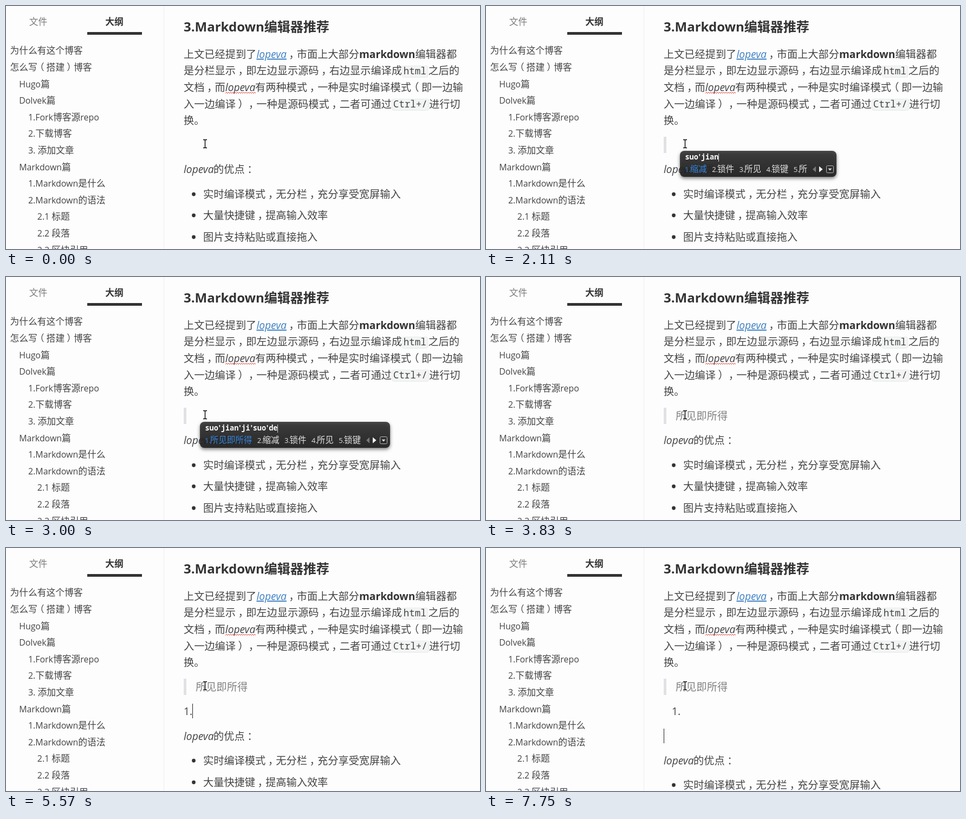
Animation of 875 by 448 pixels, one loop 8 s. Source, as an HTML page:

```html
<!DOCTYPE html>
<html lang="zh-CN">
<head>
<meta charset="utf-8">
<title>Markdown editor</title>
<style>
html, body { margin: 0; width: 100%; height: 100%; overflow: hidden; background: #fdfdfd; }
svg { display: block; }
text { font: 19.2px "Open Sans", "Noto Sans CJK SC", sans-serif; fill: #444; white-space: pre; text-spacing-trim: space-all; }
.h { font-size: 24px; font-weight: 700; fill: #333; }
.b { font-weight: 700; fill: #333; }
.i { font-style: italic; }
.link { font-style: italic; fill: #4183c4; text-decoration: underline; }
.code { font: 17.5px "Noto Sans Mono", monospace; }
.quote { fill: #808080; }
.side { font-size: 16.8px; }
.side tspan { font-size: 15.9px; }
.tab { font-size: 16.8px; fill: #7c7c7c; }
.on { font-size: 16.8px; font-weight: 700; fill: #333; }
.py { font: 700 13.5px "Noto Sans Mono", monospace; fill: #fff; }
.cand { font-size: 15.5px; fill: #e2e2e2; }
.cand tspan { font-size: 13px; }
.first { fill: #3584dc; }
#panel { filter: drop-shadow(0 3px 3px rgba(0, 0, 0, .55)); }
</style>
</head>
<body>
<svg width="875" height="448" viewBox="0 0 875 448">
  <defs>
    <linearGradient id="dark" x2="0" y2="1">
      <stop offset="0" stop-color="#343434"/>
      <stop offset="1" stop-color="#1f1f1f"/>
    </linearGradient>
    <path id="beam" d="M364 246.5h2.5l1 1 1-1h2.5M367.5 247v14M364 261.5h2.5l1-1 1 1h2.5"/>
  </defs>
  <rect width="875" height="448" fill="#fdfdfd"/>
  <g id="page"></g>
  <g id="edit"></g>
  <g id="ime"></g>
  <g fill="none">
    <use href="#beam" stroke="#fff" stroke-width="3"/>
    <use href="#beam" stroke="#000" stroke-width="1.4"/>
  </g>
</svg>
<script>
const LOOP = 8000;
const $ = id => document.getElementById(id);

// Moves full-width punctuation towards the middle of its cell
const nudge = c => "，：）".includes(c) ? .24 : c === "（" ? -.24 : 0;
function spacing(s) {
  const offs = [...s].map(nudge);
  if (!offs.some(Boolean)) return "";
  return `dx="${offs.map((o, i) => (o - (offs[i - 1] || 0)).toFixed(2) + "em").join(" ")}"`;
}

const text = (x, y, s, cls = "") => `<text x="${x}" y="${y}" class="${cls}" ${spacing(s)}>${s}</text>`;
const rect = (x, y, w, h, fill, more = "") =>
  `<rect x="${x}" y="${y}" width="${w}" height="${h}" fill="${fill}" ${more}/>`;
const path = (d, more) => `<path d="${d}" ${more}/>`;

const APP = "lopeva";
const outline = [
  [0, "为什么有这个博客"], [0, "怎么写（搭建）博客"], [1, "Hugo篇"], [1, "Dolvek篇"],
  [2, "1.Fork博客源repo"], [2, "2.下载博客"], [2, "3. 添加文章"], [1, "Markdown篇"],
  [2, "1.Markdown是什么"], [2, "2.Markdown的语法"], [3, "2.1 标题"], [3, "2.2 段落"], [3, "2.3 区块引用"]
];

function sidebar() {
  const rows = outline.map(([level, s], i) =>
    text(7.4 + 16.8 * level, Math.round(88.3 + 30.6 * i),
      s.replace(/[ -~]+/g, "<tspan>$&</tspan>"), "side"));
  return text(42.7, 35, "文件", "tab") + text(183.2, 35, "大纲", "on") +
    rect(150, 48, 101, 5, "#333") + rect(291, 0, 1, 448, "#eee") + rows.join("");
}

const code = (x, y, w, s) =>
  rect(x + .5, y - 15.5, w - 1, 21, "#f3f4f4", 'rx="3" stroke="#e7eaed"') + text(x + 2.7, y, s, "code");

function article() {
  return text(328, 47, "3.Markdown编辑器推荐", "h") +
    text(328, 96, "上文已经提到了") + text(462.4, 96, APP, "link") +
    text(517.6, 96, "，市面上大部分") + text(652, 96, "markdown", "b") + text(755.4, 96, "编辑器都") +
    text(328, 126, "是分栏显示，即左边显示源码，右边显示编译成") +
    code(731, 126, 48, "html") + text(779.4, 126, "之后的") +
    text(328, 157, "文档，而") + text(404.8, 157, APP, "i") +
    path("M405 161" + "l2 -2l2 2".repeat(14), 'fill="none" stroke="#e23b3b"') +
    text(460, 157, "有两种模式，一种是实时编译模式（即一边输") +
    text(328, 188, "入一边编译），一种是源码模式，二者可通过") +
    code(712, 187, 69, "Ctrl+/") + text(781, 188, "进行切") +
    text(328, 218, "换。");
}

const bullets = [
  [354, "实时编译模式，无分栏，充分享受宽屏输入"],
  [393.4, "大量快捷键，提高输入效率"],
  [433, "图片支持粘贴或直接拖入"]
];

function tail(shift) {
  const at = y => Math.round(y + shift);
  return text(328, at(308.3), APP, "i") + text(383, at(308.3), "的优点：") +
    bullets.map(([y, s]) =>
      `<circle cx="346.5" cy="${at(y) - 7}" r="3.4" fill="#333"/>` + text(364, at(y), s)).join("");
}

// Input method panel: pinyin on top, five numbered candidates below
function panel(pinyin, words) {
  const [head, ...rest] = pinyin.split("'");
  const typed = head + rest.map(s => `<tspan dx="-1.5">'</tspan><tspan dx="-1.5">${s}</tspan>`).join("");
  const caret = 367.5 + 8.1 * pinyin.length - 3 * rest.length;
  let x = 367, list = "";
  words.split(" ").forEach((w, i) => {
    const cls = i ? "cand" : "cand first";
    list += text(x, 306, `<tspan>${i + 1}.</tspan>`, cls) + text(x + 9.7, 306, w, cls);
    x += 19.2 + 15.5 * w.length;
  });
  x = Math.round(x);
  return rect(358, 267, x + 44 - 358, 48, "url(#dark)", 'id="panel" rx="8" fill-opacity=".9"') +
    text(367.5, 283, typed, "py") + rect(Math.round(caret), 272, 1, 15, "#ccc") + list +
    path(`M${x + 6} 295.5v11l-6-5.5z`, 'fill="#777"') +
    path(`M${x + 12} 295.5v11l6.5-5.5z`, 'fill="#fff"') +
    rect(x + 25.5, 294.5, 13, 13, "none", 'rx="2" stroke="#bbb"') +
    path(`M${x + 28.5} 299.5h7l-3.5 4z`, 'fill="#ddd"');
}

// Each step changes some fields and keeps the others
const GAP = 45.2;
const steps = [
  [0, { caret: null, line: "", bar: 0, quote: "", item: "", ime: null, shift: 0 }],
  [440, { caret: [328, 243] }],
  [710, { line: "&gt;", caret: [339, 243] }],
  [1140, { caret: [343, 243] }],
  [1290, { line: "", bar: 30, caret: [351, 243] }],
  [1690, { ime: ["s", "是 说 上 三 所"] }],
  [1840, { ime: ["suo", "所 锁 缩 索 说"], caret: null }],
  [1960, { ime: ["suo'ji", "所及 所急 锁机 所寄 索机"] }],
  [2110, { ime: ["suo'jian", "缩减 锁件 所见 锁键 所"] }],
  [2230, { ime: ["suo'jian'j", "所见即 缩减机构 缩减计划 缩减价格 缩减剂"] }],
  [2380, { ime: ["suo'jian'ji", "所见即 缩减机制 缩减剂 所见及 缩减"], caret: [351, 243] }],
  [2540, { ime: ["suo'jian'ji's", "所见即使说 缩减 锁件 所见 锁键"] }],
  [2680, { ime: ["suo'jian'ji'su", "所见即所得 缩减 锁件 所见 锁键"] }],
  [2840, { ime: ["suo'jian'ji'suo", "所见即所得 所见及所 缩减机所 缩减 锁件及锁"], caret: null }],
  [3000, { ime: ["suo'jian'ji'suo'de", "所见即所得 缩减 锁件 所见 锁键"] }],
  [3270, { ime: null, quote: "所见即所得" }],
  [3400, { caret: [447, 243] }],
  [3830, { caret: null }],
  [3950, { bar: 75, shift: GAP, caret: [351, 288] }],
  [4510, { bar: 30, caret: [328, 288] }],
  [5070, { caret: null }],
  [5440, { line: "1", caret: [339, 287] }],
  [5570, { line: "1.", caret: [344, 287] }],
  [6120, { caret: [349, 287] }],
  [6370, { line: "", item: "1.", caret: [364, 286] }],
  [6930, { caret: null }],
  [7210, { item: "1.2.", shift: GAP + 39.3, caret: [364, 326] }],
  [7610, { caret: null }],
  [7750, { item: "1.", shift: 2 * GAP, caret: [328, 333] }]
];
let state = {};
const scenes = steps.map(([t, change]) => ({ ...(state = { ...state, ...change }), t }));

function draw(s) {
  const lineY = s.t < 3950 ? 263 : 308;
  $("edit").innerHTML = tail(s.shift) +
    (s.bar ? rect(328, 241, 5, s.bar, "#dfe2e5") : "") +
    text(350.2, 263, s.quote, "quote") + text(328, lineY, s.line) +
    (s.item.match(/\d\./g) || []).map((n, i) => text(343, 308 + 39 * i, n)).join("") +
    (s.caret ? rect(s.caret[0], s.caret[1], 1, 27, "#222") : "");
  $("ime").innerHTML = s.ime ? panel(...s.ime) : "";
}

let shown;
function frame() {
  const t = performance.now() % LOOP;
  const scene = scenes.findLast(s => s.t <= t);
  if (scene !== shown) draw(shown = scene);
  requestAnimationFrame(frame);
}

$("page").innerHTML = sidebar() + article();
frame();
</script>
</body>
</html>
```
